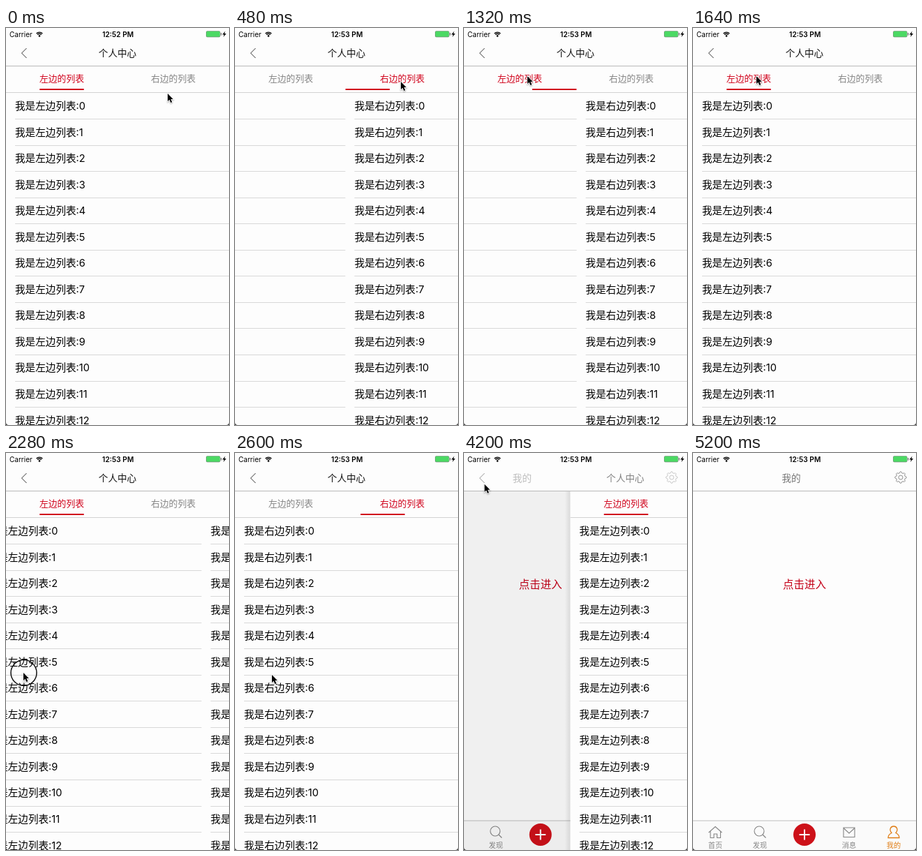
An HTML page with a canvas for the animation above (5.24 s loop, 320 px wide and 569 px high).

```html
<!DOCTYPE html>
<html lang="zh-CN">
<head>
<meta charset="utf-8">
<style>
html, body { margin: 0; width: 100%; height: 100%; overflow: hidden; background: #fdfdfd; }
canvas { display: block; width: 320px; height: 569px; }
</style>
</head>
<body>
<canvas></canvas>
<script>
const W = 320, H = 569, LOOP = 5240, ROW = 37.55;
const PAPER = '#fdfdfd', RED = '#d0021b', GREY = '#858585', ORANGE = '#df7d16';
const canvas = document.querySelector('canvas');
const c = canvas.getContext('2d');
const ratio = window.devicePixelRatio || 1;
canvas.width = W * ratio;
canvas.height = H * ratio;

const ramp = (t, start, length) => Math.min(1, Math.max(0, (t - start) / length));
const inOut = u => u * u * (3 - 2 * u);
const out = u => 1 - (1 - u) ** 3;

// The lists switch back and forth: twice by tapping a tab, twice by swiping.
const switches = [
  { at: 330 }, { at: 1170 },
  { at: 2210, swipe: true }, { at: 2780, swipe: true }
];
const tabStart = s => s.at + (s.swipe ? 215 : 0);
const alternate = progress => switches.reduce((sum, s, i) => sum + (i % 2 ? -1 : 1) * progress(s), 0);
const scrollAt = t => alternate(s => s.swipe
  ? 0.11 * ramp(t, s.at, 70) + 0.89 * out(ramp(t, s.at + 70, 200))
  : inOut(ramp(t, s.at, 300)));
const underlineAt = t => alternate(s => inOut(ramp(t, tabStart(s), 240)));
const rightActive = t => alternate(s => t >= tabStart(s)) > 0;

const moves = [
  { at: 20, to: [238, 77] },
  { at: 740, to: [259, 67] },
  { at: 900, to: [91, 69] },
  { at: 1780, to: [61, 317], length: 260 },
  { at: 2210, to: [25, 315], length: 70 },
  { at: 2320, to: [53, 318], length: 240 },
  { at: 2780, to: [183, 291], length: 320 },
  { at: 3340, to: [25, 36], length: 420 },
  { at: 4120, to: [300, 575], length: 1070 }
];
const touches = [2215, 2785, 3760];

function cursorAt(t) {
  return moves.reduce(([x, y], { at, to, length = 140 }) => {
    const u = inOut(ramp(t, at, length));
    return [x + (to[0] - x) * u, y + (to[1] - y) * u];
  }, [232, 94]);
}

function text(str, x, middle, size, color, align = 'left', weight = 400) {
  c.font = `${weight} ${size}px Inter, "Noto Sans CJK SC", "Noto Sans CJK", sans-serif`;
  c.textAlign = align;
  c.fillStyle = color;
  c.fillText(str, x, middle + size * 0.36);
}
function rect(x, y, w, h, color) {
  c.fillStyle = color;
  c.fillRect(x, y, w, h);
}
function pill(x, y, w, h, r, color) {
  c.fillStyle = color;
  c.beginPath();
  c.roundRect(x, y, w, h, r);
  c.fill();
}
function fill(path, color) {
  c.fillStyle = color;
  c.fill(new Path2D(path));
}
function stroke(path, color, width = 1) {
  c.strokeStyle = color;
  c.lineWidth = width;
  c.stroke(new Path2D(path));
}
function disc(x, y, r, color) {
  c.fillStyle = color;
  c.beginPath();
  c.arc(x, y, r, 0, 7);
  c.fill();
}
function ring(x, y, r, color, width, from = 0, to = 7) {
  c.strokeStyle = color;
  c.lineWidth = width;
  c.beginPath();
  c.arc(x, y, r, from, to);
  c.stroke();
}
function shifted(x, alpha, draw) {
  c.save();
  c.translate(x, 0);
  c.globalAlpha = alpha;
  draw();
  c.restore();
}

function list(side, x) {
  for (let i = 0; i < 13; i++) {
    text(`我是${side}边列表:${i}`, x + 13, 111.7 + ROW * i, 14.6, '#000');
    rect(x + 13, Math.round(130 + ROW * i), W - 13, 1, '#d8d8d8');
  }
}

function listPage(t) {
  rect(0, 0, W, H, PAPER);
  const scroll = W * scrollAt(t), right = rightActive(t);
  c.save();
  c.beginPath();
  c.rect(0, 93, W, H);
  c.clip();
  list('左', -scroll);
  list('右', W - scroll);
  c.restore();
  text('左边的列表', 80, 72, 12.8, right ? GREY : RED, 'center');
  text('右边的列表', 240, 72, 12.8, right ? RED : GREY, 'center');
  rect(0, 92, W, 1, '#d2d2d2');
  pill(48 + 160 * underlineAt(t), 87, 64, 2, 1, RED);
}

function homePage() {
  rect(0, 0, W, H, PAPER);
  text('点击进入', 160, 188, 15.5, '#c40018', 'center');
  rect(0, 527, W, 42, '#fafafa');
  rect(0, 526.5, W, 1, '#bdbdbd');
  stroke('M22.5 544 L32 535.5 41.5 544 M25 542 V551.5 H30 V546 H34.5 V551.5 H39.5 V542', GREY, 1.1);
  ring(95, 542, 7, GREY, 1.1);
  stroke('M100 547 L104.5 551.5', GREY, 1.2);
  disc(160, 547, 16, '#cd1119');
  stroke('M152.5 547 H167.5 M160 539.5 V554.5', '#fff', 2);
  stroke('M216 537 H232 V550.5 H216 Z M216 537.5 L224 545 232 537.5', GREY, 1.1);
  stroke('M285 544.5 C281 540 283.5 535 288 535 S295 540 291 544.5 C294 546 296 548 296 551.5 H280 C280 548 282 546 285 544.5 Z', ORANGE, 1.3);
  ['首页', '发现', '', '消息', '我的'].forEach((name, i) =>
    text(name, 32 + 64 * i, 562, 10.2, i === 4 ? ORANGE : GREY, 'center'));
}

function gear(x, y) {
  c.beginPath();
  for (let i = 0; i < 32; i++) {
    const r = i % 4 < 2 ? 8.2 : 6.4, a = (i - 0.5) * Math.PI / 16;
    c.lineTo(x + r * Math.cos(a), y + r * Math.sin(a));
  }
  c.closePath();
  c.strokeStyle = GREY;
  c.lineWidth = 0.9;
  c.stroke();
  ring(x, y, 3, GREY, 0.9);
}

function bars(t, pop) {
  rect(0, 0, W, 54, PAPER);
  rect(0, 54, W, 1, '#b9b9b9');
  shifted(150 * pop, 1 - pop, () => text('个人中心', 160, 36, 13.6, '#111', 'center'));
  shifted(0, 1 - pop, () => stroke('M29.5 29 L22.5 36 29.5 43', '#333'));
  shifted(-110 * (1 - pop), pop, () => text('我的', 141, 36, 13.6, '#777', 'center'));
  shifted(0, pop, () => gear(298, 35));

  text('Carrier', 5, 9, 10, '#000');
  for (const r of [6.2, 4]) ring(48, 12.3, r, '#000', 1.4, -2.36, -0.78);
  disc(48, 11.4, 1.3, '#000');
  text(t < 80 ? '12:52 PM' : '12:53 PM', 160.7, 9, 10.2, '#000', 'center', 600);
  pill(287, 4.2, 20.5, 9, 1.8, '#7d8f80');
  pill(287.6, 4.8, 19.3, 7.8, 1.3, '#4cd964');
  rect(308, 7, 1.3, 3.5, '#777');
  fill('M314.5 4.5 L310.5 9.5 H313 L312 13 316 8 H313.5 Z', '#000');
}

function cursor(t) {
  const [x, y] = cursorAt(t);
  if (touches.some(at => t >= at && t < at + 80)) ring(x + 0.5, y, 18.5, '#111', 1.5);
  const arrow = 'M0 0 V11 L2.5 8.7 4.4 13 6.3 12.2 4.5 8 H7.8 Z';
  c.save();
  c.translate(x, y);
  c.shadowColor = 'rgba(0,0,0,.35)';
  c.shadowBlur = 2 * ratio;
  c.shadowOffsetY = ratio;
  stroke(arrow, '#fff', 1.5);
  c.shadowColor = 'transparent';
  fill(arrow, '#000');
  c.restore();
}

function render(t) {
  c.setTransform(ratio, 0, 0, ratio, 0, 0);
  const pop = out(ramp(t, 4100, 520));
  if (pop > 0) {
    shifted(-96 * (1 - pop), 1, homePage);
    rect(0, 0, W, H, `rgba(0,0,0,${0.1 * (1 - pop)})`);
  }
  if (pop < 1) {
    shifted(W * pop, 1, () => {
      const shade = c.createLinearGradient(-8, 0, 0, 0);
      shade.addColorStop(0, 'rgba(0,0,0,0)');
      shade.addColorStop(1, `rgba(0,0,0,${0.18 * (1 - pop)})`);
      rect(-8, 0, 8, H, shade);
      listPage(t);
    });
  }
  bars(t, pop);
  cursor(t);
  fill('M0 565 Q0 569 4 569 H0 Z M320 565 Q320 569 316 569 H320 Z', '#333');
}

const start = performance.now();
function tick() {
  render((performance.now() - start) % LOOP);
  requestAnimationFrame(tick);
}
tick();
</script>
</body>
</html>
```
